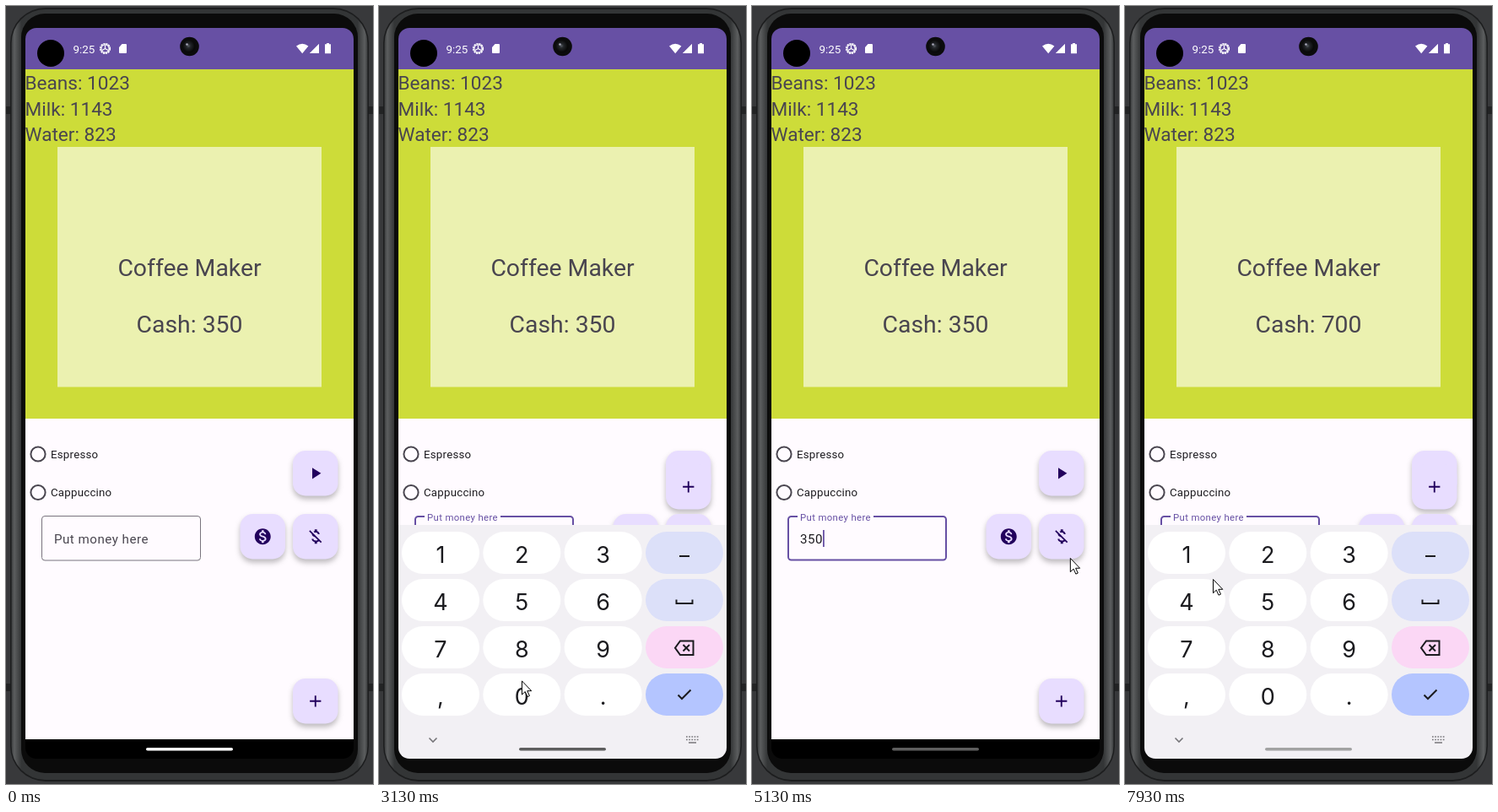
An HTML page for the animation above (8 s loop, 435 by 922 pixels).

```html
<!DOCTYPE html>
<html lang="en">
<head>
<meta charset="utf-8">
<title>Coffee Maker</title>
<style>
  html, body { margin: 0; width: 100%; height: 100%; overflow: hidden; background: #38393b; }
  svg { display: block; width: 435px; height: 922px; font-family: Roboto, sans-serif; }
  .stock { font-size: 22.6px; fill: #49454f; }
  .title { font-size: 28.4px; fill: #49454f; text-anchor: middle; }
  .option { font-size: 13.26px; letter-spacing: .24px; fill: #1c1b1f; }
  .input { font-size: 15.15px; letter-spacing: .47px; fill: #1c1b1f; }
  .digit { font: 27px Inter, sans-serif; text-anchor: middle; fill: #1b1b1f; }
  .raised { filter: drop-shadow(0 4px 3px rgba(0, 0, 0, .26)); }
  .line { fill: none; stroke: #1b1b1f; stroke-width: 2; }
</style>
</head>
<body>
<svg viewBox="0 0 435 922">
  <defs>
    <clipPath id="screenClip"><rect x="23" y="26" width="389" height="866" rx="13"/></clipPath>
    <clipPath id="appClip"><rect id="appArea" x="23" y="75" width="389" height="794"/></clipPath>
    <clipPath id="moneyClip"><rect x="277.5" y="602" width="53.5" height="53.5" rx="15"/></clipPath>
    <linearGradient id="metal">
      <stop offset="0" stop-color="#3c3e3f"/><stop offset=".008" stop-color="#5c5e5f"/>
      <stop offset=".028" stop-color="#333536"/><stop offset=".972" stop-color="#333536"/>
      <stop offset=".992" stop-color="#5c5e5f"/><stop offset="1" stop-color="#3c3e3f"/>
    </linearGradient>
    <radialGradient id="lens" cx=".45" cy=".45">
      <stop offset="0" stop-color="#555a60"/><stop offset=".35" stop-color="#23262a"/><stop offset="1" stop-color="#080808"/>
    </radialGradient>
  </defs>

  <rect width="435" height="922" fill="#38393b"/>
  <path d="M0 119h5v9h-5zM430 119h5v9h-5zM0 803h5v9h-5zM430 803h5v9h-5z" fill="#222324"/>
  <rect x="5" y="2" width="425" height="917" rx="42" fill="#1c1d1e"/>
  <rect x="6.5" y="4" width="422" height="913" rx="40" fill="url(#metal)"/>
  <rect x="18" y="9" width="399" height="900" rx="28" fill="#0b0b0b"/>

  <g clip-path="url(#screenClip)">
    <rect x="23" y="26" width="389" height="866" fill="#000"/>
    <rect x="23" y="26" width="389" height="49" fill="#6750a4"/>
    <g fill="#fff">
      <text x="79.5" y="55.5" font-size="13.4">9:25</text>
      <g fill="none" stroke="#fff">
        <circle cx="117.5" cy="50.5" r="5.8" stroke-width="1.6" stroke-dasharray="2.3 .75"/>
        <circle cx="117.5" cy="50.5" r="4.6" stroke-width="1.3"/>
        <path d="M117.5 50.5v-4M117.5 50.5l-3.5 2M117.5 50.5l3.5 2" stroke-width="1.2"/>
      </g>
      <path d="M137.5 45h4.5a1 1 0 0 1 1 1v9a1 1 0 0 1-1 1h-7a1 1 0 0 1-1-1v-6z"/>
      <path d="M344 47.5q7.2-5.6 14.4 0l-7.2 8.7zM371 44.8v11.2h-11.2z"/>
      <path d="M380 44h3v1.3h2v10.9h-7v-10.9h2z"/>
    </g>
    <circle cx="53" cy="56" r="16"/>
    <circle cx="217.5" cy="48" r="11.3" fill="#0b0b0c"/>
    <circle cx="217" cy="48" r="7.5" fill="url(#lens)"/>
    <circle cx="214.5" cy="45.5" r="1.3" fill="#aab"/>

    <rect x="23" y="75" width="389" height="794" fill="#fffbff"/>
    <g clip-path="url(#appClip)">
      <rect x="23" y="75" width="389" height="414" fill="#cddc39"/>
      <rect x="61" y="167" width="313" height="284.5" fill="#ebf1b0"/>
      <text class="stock" x="22.5" y="99">Beans: 1023</text>
      <text class="stock" x="22.5" y="130">Milk: 1143</text>
      <text class="stock" x="22.5" y="160">Water: 823</text>
      <text class="title" x="217.5" y="320">Coffee Maker</text>
      <text class="title" x="217.5" y="387" id="cash"></text>
      <g fill="none" stroke="#49454f" stroke-width="2">
        <circle cx="38" cy="531" r="8.6"/><circle cx="38" cy="576.5" r="8.6"/>
      </g>
      <text class="option" x="53" y="536">Espresso</text>
      <text class="option" x="53" y="581">Cappuccino</text>
      <rect id="outline" rx="3.5" fill="none"/>
      <rect id="notch" x="54" y="602" height="6" fill="#fffbff"/>
      <text id="label" class="input">Put money here</text>
      <text id="amount" class="input" x="57" y="637"></text>
      <rect id="caret" y="621" width="1.8" height="20" fill="#6750a4"/>
      <g id="buttons"></g>
    </g>
    <g id="keyboard"></g>
    <rect id="handle" x="166" y="879" width="103" height="3.6" rx="1.8"/>
  </g>
  <path id="cursor" d="M.5 .5v16.2l3.8-3.5 2.7 6 2.5-1.1-2.7-5.8h5z" fill="#fff" stroke="#000"/>
</svg>
<script>
const $ = id => document.getElementById(id);
const set = (id, attrs) => { for (const k in attrs) $(id).setAttribute(k, attrs[k]); };
const show = (id, on) => set(id, { visibility: on ? 'visible' : 'hidden' });
const clamp = v => Math.max(0, Math.min(1, v));
const mix = (a, b, p) => a + (b - a) * p;
const ramp = (t, start, length) => clamp((t - start) / length);
const during = (t, from, to) => t >= from && t < to;
const easeOut = p => 1 - (1 - p) ** 2.2;
const smooth = p => p * p * (3 - 2 * p);

const LOOP = 8000, OPEN = 1283, CLOSE = 4900, REOPEN = 6940;

const ICONS = {
  play: 'M8 5v14l11-7z',
  money: 'M12 2C6.48 2 2 6.48 2 12s4.48 10 10 10 10-4.48 10-10S17.52 2 12 2zm1.41 16.09V20h-2.67v-1.93c-1.71-.36-3.16-1.46-3.27-3.4h1.96c.1 1.05.82 1.87 2.65 1.87 1.96 0 2.4-.98 2.4-1.59 0-.83-.44-1.61-2.67-2.14-2.48-.6-4.18-1.62-4.18-3.67 0-1.72 1.39-2.84 3.11-3.21V4h2.67v1.95c1.86.45 2.79 1.86 2.85 3.39H14.3c-.05-1.11-.64-1.87-2.22-1.87-1.5 0-2.4.68-2.4 1.64 0 .84.65 1.39 2.67 1.91s4.18 1.39 4.18 3.91c-.01 1.83-1.38 2.83-3.12 3.16z',
  refund: 'M12.5 6.9c1.78 0 2.44.85 2.5 2.1h2.21c-.07-1.72-1.12-3.3-3.21-3.81V3h-3v2.16c-.53.12-1.03.3-1.48.54l1.47 1.47c.41-.17.91-.27 1.51-.27zM5.33 4.06L4.06 5.33 7.5 8.77c0 2.08 1.56 3.21 3.91 3.91l3.51 3.51c-.34.48-1.05.91-2.42.91-2.06 0-2.87-.92-2.98-2.1h-2.2c.12 2.19 1.76 3.42 3.68 3.83V21h3v-2.15c.96-.18 1.82-.55 2.45-1.12l2.22 2.22 1.27-1.27z',
  add: 'M19 13h-6v6h-2v-6H5v-2h6V5h2v6h6z'
};
const BUTTONS = [['play', 340, 527], ['money', 277.5, 602], ['refund', 340, 602], ['add', 340, 797]];

// One shared shadow lets overlapping buttons merge into a single shape.
$('buttons').innerHTML = '<g class="raised" fill="#e8ddff">'
  + BUTTONS.map(([id, x, y]) => `<rect id="${id}" x="${x}" y="${y}" width="53.5" height="53.5" rx="15"/>`).join('')
  + '</g><circle id="ripple" cx="306" cy="632" fill="#6750a4" clip-path="url(#moneyClip)"/>'
  + BUTTONS.map(([id, x, y]) => `<path id="${id}Icon" d="${ICONS[id]}" fill="#22005d"
      transform="translate(${x + 15.4} ${y + 15.4}) scale(.947)"/>`).join('');

// Keypad: three columns of characters and one of actions.
const columnX = c => 27 + c * 96.33, rowY = r => 623 + r * 56;
const keyShape = (id, c, r, fill) =>
  `<rect id="${id}" x="${columnX(c)}" y="${rowY(r)}" width="92" height="50" rx="25" fill="${fill}"/>`;
let keys = '<rect x="23" y="615" width="389" height="277" fill="#f2f0f4"/>';
[...'123456789,0.'].forEach((char, i) => {
  const c = i % 3, r = Math.floor(i / 3);
  keys += keyShape('key' + i, c, r, '#fff')
    + `<text class="digit" x="${columnX(c) + 46}" y="${rowY(r) + 36.5}">${char}</text>`;
});
['#dce0f9', '#dce0f9', '#fbd7f5', '#b4c5ff'].forEach((fill, r) => keys += keyShape('action' + r, 3, r, fill));
keys += `<path class="line" d="M356 652h12M352.5 703.5v4.5h19v-4.5M357 752.5h15.5v16.5h-15.5l-6-8.25zM360.5 757l7.5 7.5M368 757l-7.5 7.5M354.5 816.5l4.5 4.5 10.5-10.5"/>
  <path d="M59.5 867.5l4.5 4.5 4.5-4.5" fill="none" stroke="#77767a" stroke-width="1.6"/>
  <path d="M364 866h15M364 869.5h15" stroke="#77767a" stroke-width="1.7" stroke-dasharray="1.7 1.5"/>
  <path d="M367 873h9" stroke="#77767a" stroke-width="1.5"/>`;
$('keyboard').innerHTML = keys;

// Key presses: element, start, end, pressed colour, resting colour.
const PRESSES = [
  ['key2', 2070, 2200, '#dedde2', '#fff'],
  ['key4', 2990, 3090, '#dedde2', '#fff'],
  ['key10', 4060, 4125, '#dedde2', '#fff'],
  ['action3', 4790, 4900, '#9db0ea', '#b4c5ff']
];

// Pointer stops: time, x, y.
const POINTER = [
  [200, 445, 935], [530, 221, 797], [620, 221, 797], [1000, 139, 622], [1540, 139, 622],
  [2000, 262, 645], [2260, 262, 645], [2800, 169, 706], [3020, 169, 706], [3130, 169, 799],
  [3330, 158, 873], [3540, 158, 873], [3600, 176, 833], [3810, 176, 833], [3930, 176, 811],
  [4070, 176, 811], [4130, 209, 819], [4600, 361, 817], [4900, 361, 817], [5130, 377, 654],
  [5540, 307, 630], [6080, 307, 630], [6400, 122, 686], [6780, 108, 637], [7150, 108, 637],
  [7600, 104, 679], [8000, 104, 679]
];
function pointerAt(t) {
  const i = Math.max(1, POINTER.findIndex(stop => stop[0] > t));
  const [t0, x0, y0] = POINTER[i - 1], [t1, x1, y1] = POINTER[i];
  const p = clamp((t - t0) / (t1 - t0));
  return [mix(x0, x1, p), mix(y0, y1, p)];
}

function draw(t) {
  const rise = easeOut(ramp(t, OPEN, 285)) - smooth(ramp(t, CLOSE, 200)) + easeOut(ramp(t, REOPEN, 285));
  set('keyboard', { transform: `translate(0 ${277 * (1 - rise)})`, opacity: rise });
  show('keyboard', rise > 0);
  const shrunk = during(t, OPEN, CLOSE) || t >= REOPEN;
  const addY = shrunk ? 543 : 797;
  set('appArea', { height: shrunk ? 540 : 794 });
  set('add', { y: addY });
  set('addIcon', { transform: `translate(355.4 ${addY + 15.4}) scale(.947)` });
  show('playIcon', !shrunk);

  const focused = t >= 1320, float = easeOut(ramp(t, 1335, 150));
  const labelSize = mix(15.15, 11.36, float);
  const stroke = focused ? 2 : 1;
  set('outline', { x: 42 + stroke / 2, y: 604 + stroke / 2, width: 189 - stroke, height: 53.5 - stroke,
    stroke: focused ? '#6750a4' : '#79747e', 'stroke-width': stroke });
  set('notch', { width: focused ? 6 + 84 * labelSize / 11.36 : 0 });
  set('label', { x: 57, y: mix(636.5, 610, float),
    style: `font-size:${labelSize}px;letter-spacing:${labelSize * .032}px;fill:${focused ? '#6750a4' : '#49454f'}` });

  const paid = t >= 6070;
  $('cash').textContent = 'Cash: ' + (paid ? 700 : 350);
  $('amount').textContent = during(t, 4070, 6070) ? '350' : during(t, 3000, 4070) ? '35' : during(t, 2070, 3000) ? '3' : '';
  set('caret', { x: paid ? 57 : 84 });
  show('caret', during(t, 5080, 5580) || paid && (t - 6070) % 1000 < 500);
  set('ripple', { r: t < 5800 ? 0 : mix(12, 44, ramp(t, 5800, 225)), opacity: .32 * (1 - ramp(t, 6420, 250)) });

  // The gesture bar adapts to its backdrop a little after each keyboard change.
  const dark = ramp(t, OPEN + 800, 330) - ramp(t, CLOSE + 830, 330) + ramp(t, REOPEN + 800, 330);
  const grey = mix(255, 94, dark);
  set('handle', { fill: `rgb(${grey},${grey},${grey})` });

  for (const [id, from, to, pressed, rest] of PRESSES) set(id, { fill: during(t, from, to) ? pressed : rest });
  set('cursor', { transform: `translate(${pointerAt(t)})` });
  show('cursor', t >= 270);
}

function tick() {
  draw(performance.now() % LOOP);
  requestAnimationFrame(tick);
}
tick();
</script>
</body>
</html>
```
